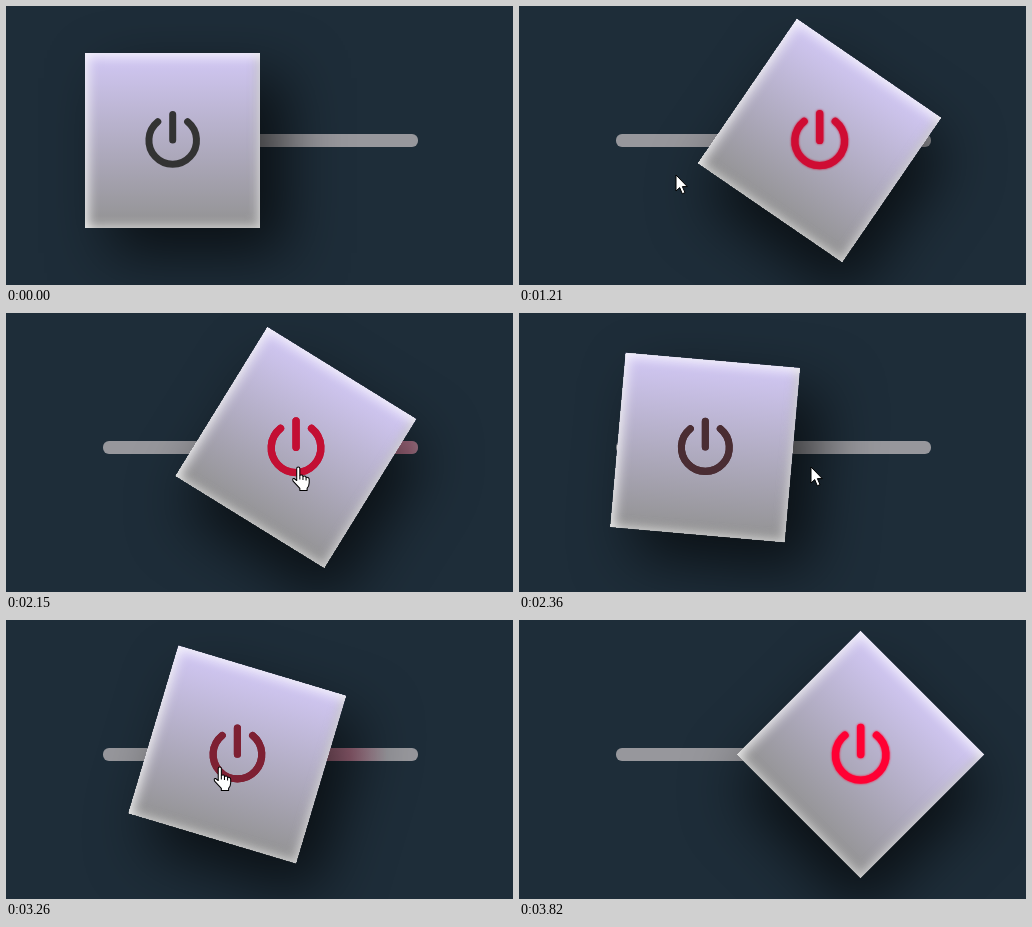
Animation of 507 by 279 pixels, one loop 4.35 s. Source, as an HTML page:

```html
<!DOCTYPE html>
<html lang="en">
<head>
<meta charset="utf-8">
<title>Sliding power button</title>
<style>
  html, body { margin: 0; width: 100%; height: 100%; overflow: hidden; background: #1e2d39; }
  body { position: relative; }
  div, svg { position: absolute; }
  #track {
    left: 97px; top: 128px; width: 315px; height: 13px;
    border-radius: 6px; overflow: hidden; background: #97979c;
  }
  #glow {
    left: 0; top: 0; width: 150px; height: 13px;
    background: linear-gradient(90deg, rgba(190, 70, 110, .5) 75%, rgba(190, 70, 110, 0));
  }
  #button {
    left: 79px; top: 47px; width: 175px; height: 175px;
    background: linear-gradient(#d2c8f5, #929292);
    box-shadow:
      25px 25px 60px rgba(0, 0, 0, .65),
      inset 4px 4px 11px rgba(255, 255, 255, .75),
      inset -4px -4px 10px rgba(195, 195, 195, .8);
  }
  #overlay { left: 0; top: 0; }
</style>
</head>
<body>
<div id="track"><div id="glow"></div></div>
<div id="button"></div>
<svg id="overlay" width="507" height="279">
  <g id="icon" fill="none" stroke-width="7" stroke-linecap="round">
    <path d="M-14.700 -18.200A23.800 23.800 0 1 0 15.100 -18.200M.2 -25.500V0"/>
  </g>
  <g id="cursor" fill="#fff" stroke="#000" stroke-linejoin="round">
    <path id="arrow" d="M0 0V16L3.7 12.6 6.3 18.8 9 17.6 6.4 11.6H11.3Z"/>
    <g id="hand" transform="translate(-7 -1) scale(1.04)">
      <path d="M5.5 14V2.5a1.5 1.5 0 0 1 3 0V9q3-1 3 1 3-1 3 1 3-.5 3 2V16q0 3-2 5.5V23.5H8.5V21.5L2 14.5q-1-3 1-2.5Z"/>
      <path d="M8.5 9V13M11.5 10V13.5M14.5 11V14" fill="none"/>
    </g>
  </g>
</svg>
<script>
const LOOP = 4350, SLIDE = 520, STEP = 70;
const HOME = { x: 166.5, y: 134.5 }, TRAVEL = 175, HALF = 87.5, TRACK_LEFT = 97;

// Each slide starts at its click and is drawn in even steps counted from the press.
const slides = [
  { press: 930, click: 968 },
  { press: 2010, click: 2046 },
  { press: 3120, click: 3139 }
];

const entry = { x: 261, y: 234 };
const glides = [
  { start: 190, length: 300, x: 157, y: 169 },
  { start: 1950, length: 1, x: 292, y: 154 },
  { start: 2390, length: 230, x: 213.5, y: 147 },
  { start: 3470, length: 300, x: 224, y: 300 }
];

const $ = id => document.getElementById(id);
const clamp = v => Math.max(0, Math.min(1, v));
const mix = (a, b, k) => a + (b - a) * k;
const easeOut = k => 1 - (1 - k) ** 2;

// cubic-bezier(.25, .1, .25, 1), solved by bisection
function ease(x) {
  let low = 0, high = 1;
  for (let i = 0; i < 20; i++) {
    const s = (low + high) / 2;
    if (.75 * s * (1 - s) + s ** 3 < clamp(x)) low = s; else high = s;
  }
  return .3 * low * (1 - low) ** 2 + 3 * low * low * (1 - low) + low ** 3;
}

function sinceClick(t, { press, click }) {
  return press + Math.floor((t - press) / STEP) * STEP - click;
}

function pointerAt(t) {
  return glides.reduce((from, to) => {
    const k = easeOut(clamp((t - to.start) / to.length));
    return { x: mix(from.x, to.x, k), y: mix(from.y, to.y, k) };
  }, entry);
}

function isOver(point, centerX, angle) {
  const dx = point.x - centerX, dy = point.y - HOME.y;
  const c = Math.cos(angle), s = Math.sin(angle);
  return Math.abs(dx * c + dy * s) < HALF && Math.abs(dy * c - dx * s) < HALF;
}

function draw(t) {
  const ages = slides.map(slide => sinceClick(t, slide));
  const p = ages.reduce((sum, age, i) => sum + (i % 2 ? -1 : 1) * ease(age / SLIDE), 0);
  const centerX = HOME.x + TRAVEL * p, angle = p * Math.PI / 4;

  $('button').style.transform = `translateX(${TRAVEL * p}px) rotate(${angle}rad)`;

  const icon = $('icon');
  const color = `rgb(${mix(51, 255, p)}, ${mix(51, 0, p)}, 51)`;
  icon.setAttribute('transform', `translate(${centerX} ${HOME.y - .5 * (1 - p)}) scale(${1 + .06 * p})`);
  icon.setAttribute('stroke', color);
  icon.style.filter = p > 0 ? `drop-shadow(0 0 ${p}px ${color})` : 'none';

  // The press tints the track briefly.
  const tints = ages.map(age => clamp(Math.min(age + 40, 230 - age) / 100));
  $('glow').style.opacity = Math.max(...tints);
  $('glow').style.transform = `translateX(${centerX - TRACK_LEFT}px)`;

  const pointer = pointerAt(t), over = isOver(pointer, centerX, angle);
  $('cursor').setAttribute('transform', `translate(${pointer.x} ${pointer.y})`);
  $('cursor').style.display = t < glides[0].start ? 'none' : '';
  $('hand').style.display = over ? '' : 'none';
  $('arrow').style.display = over ? 'none' : '';
}

const began = performance.now();
function tick() {
  draw((performance.now() - began) % LOOP);
  requestAnimationFrame(tick);
}
tick();
</script>
</body>
</html>
```
